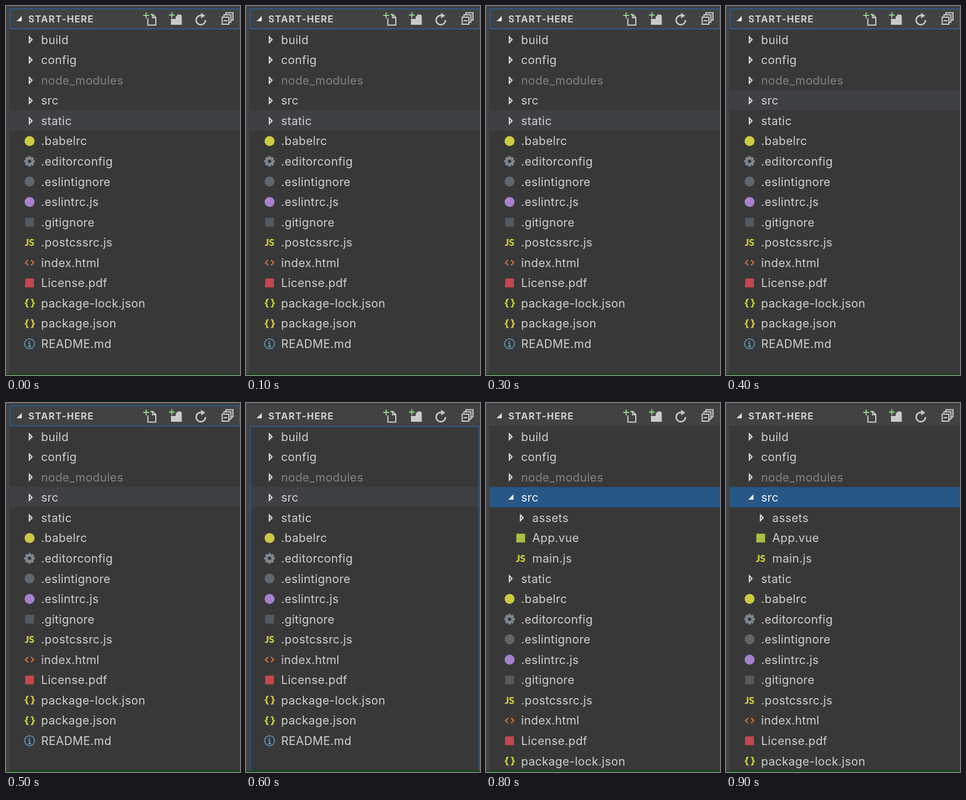
Animation, 400 px wide and 629 px high, one loop 1000 ms. Source, as an HTML page:

```html
<!DOCTYPE html>
<html lang="en">
<head>
<meta charset="utf-8">
<title>File explorer</title>
<style>
  html, body { margin: 0; width: 100%; height: 100%; overflow: hidden; background: #383838; }
  svg { display: block; width: 100%; height: 100%; }
  text { font-family: Inter, "Open Sans", sans-serif; }
  .name { font-size: 19.8px; letter-spacing: .32px; fill: #cfcfcf; }
  .dim { fill: #828282; }
  .picked { fill: #f4f4f4; }
  .title { font-size: 16px; font-weight: 700; letter-spacing: 1.1px; fill: #cecece; }
  .js { font: 900 16.5px Lato, "Open Sans", sans-serif; }
  .json { font-size: 17px; font-weight: 800; letter-spacing: -.5px; }
  .js, .json { fill: #cbcb41; text-anchor: middle; }
  .line { fill: none; stroke-width: 2; }
</style>
</head>
<body>
<svg viewBox="0 0 400 629" preserveAspectRatio="none">
  <rect width="400" height="629" fill="#383838"/>
  <rect width="5.5" height="629" fill="#434343"/>
  <rect width="400" height="5" fill="#404040"/>
  <rect x="5.5" y="5" width="394.5" height="34" fill="#424242"/>
  <rect id="band" x="5.5" width="394.5" height="34.5"/>
  <g id="tree"></g>

  <path d="M27 17V26H18Z" fill="#e2e2e2"/>
  <text class="title" x="38" y="28">START-HERE</text>
  <g class="line" stroke="#c9c9c9">
    <path d="M247 14.5H251L256 19.5V32.5H242.5V21M250.5 14.5V20H256"/>
    <path d="M290 17.5H291.5L293 14.5H299L300.5 17.5V32H282V22H290Z" fill="#c9c9c9" stroke="none"/>
    <path d="M341 24A8 8 0 1 1 335 16.3" stroke-width="2.6"/>
    <path d="M333.5 11.5L340.5 16.5L333.5 21Z" fill="#c9c9c9" stroke="none"/>
    <path d="M376 14V11.5H388V24H385M372.5 17.5V15H384.5V27.5H381.5"/>
    <path d="M369.5 19H381V31H369.5ZM372 25H378.5"/>
  </g>
  <path class="line" d="M239.5 11V21M234.5 16H244.5M283.5 10.5V20.5M278.5 15.5H288.5" stroke="#8fce91" stroke-width="2.6"/>

  <rect id="focus" x="7" fill="none" stroke="#2f5f97" stroke-width="1.6"/>
  <rect y="627" width="400" height="2" fill="#0c4d10"/>
</svg>
<script>
const LOOP = 1000, HOVER_SRC = 400, FOCUS_TREE = 600, OPEN_SRC = 800;
const PITCH = 34.55, FIRST = 57.5;
const byId = id => document.getElementById(id);
const rowY = i => FIRST + i * PITCH;

const dot = color => `<circle r="8.5" fill="${color}"/>`;
const square = color => `<rect x="-7.5" y="-7.5" width="15" height="15" fill="${color}"/>`;
const teeth = [0, 45, 90, 135].map(a =>
  `<rect x="-2.2" y="-9" width="4.4" height="18" transform="rotate(${a})"/>`).join("");

const icons = {
  closed: `<path class="line" d="M-.4 -4.8L4.2 0L-.4 4.8Z" stroke="#dedede" stroke-width="1.6"/>`,
  open: `<path d="M6.7 -5.5V3.5H-2.3Z" fill="#f4f4f4"/>`,
  gear: `<g fill="#7f8990">${teeth}<circle r="6.8"/></g><circle r="3" fill="#383838"/>`,
  js: `<text class="js" y="6">JS</text>`,
  json: `<text class="json" y="5.5">{ }</text>`,
  html: `<path class="line" d="M-2.5 -4.5L-7 0L-2.5 4.5M2.5 -4.5L7 0L2.5 4.5" stroke="#d8713c"/>`,
  info: `<g class="line" stroke="#6299bd"><circle r="8.5" stroke-width="1.7"/><path d="M0 -5V-2.8M-2 -1H0V5M-2.5 5H2.5"/></g>`,
  babel: dot("#cbcb41"),
  ignore: dot("#60666a"),
  lint: dot("#a681cd"),
  git: square("#525a60"),
  pdf: square("#c4484e"),
  vue: square("#a9bf45")
};

const before = [["build", "closed"], ["config", "closed"], ["node_modules", "closed", 0, "dim"]];
const children = [["assets", "closed", 1], ["App.vue", "vue", 1], ["main.js", "js", 1]];
const after = [
  ["static", "closed"], [".babelrc", "babel"], [".editorconfig", "gear"],
  [".eslintignore", "ignore"], [".eslintrc.js", "lint"], [".gitignore", "git"],
  [".postcssrc.js", "js"], ["index.html", "html"], ["License.pdf", "pdf"],
  ["package-lock.json", "json"], ["package.json", "json"], ["README.md", "info"]
];

function row([name, icon, depth = 0, tone = ""], i) {
  return `<g transform="translate(${depth * 19} ${rowY(i)})">
    <g transform="translate(40.3 0)">${icons[icon]}</g>
    <text class="name ${tone}" x="60" y="7.2">${name}</text></g>`;
}

function treeMarkup(open) {
  const src = ["src", open ? "open" : "closed", 0, open ? "picked" : ""];
  return [...before, src, ...(open ? children : []), ...after].map(row).join("");
}

const trees = [treeMarkup(false), treeMarkup(true)];
const band = byId("band"), focus = byId("focus");
let shown = -1;

function draw(t) {
  const open = t >= OPEN_SRC, inTree = t >= FOCUS_TREE;
  if (shown !== +open) {
    shown = +open;
    byId("tree").innerHTML = trees[shown];
  }
  band.setAttribute("y", rowY(t < HOVER_SRC ? 4 : 3) - 17.9);
  band.setAttribute("fill", open ? "#265787" : "#3f4043");
  // The tree's outline runs past the bottom edge.
  focus.setAttribute("y", inTree ? 40 : 5);
  focus.setAttribute("height", inTree ? 600 : 34);
  focus.setAttribute("width", inTree ? 391.5 : 392.5);
  focus.setAttribute("visibility", open ? "hidden" : "visible");
}

const start = performance.now();
function tick() {
  draw((performance.now() - start) % LOOP);
  requestAnimationFrame(tick);
}
draw(0);
requestAnimationFrame(tick);
</script>
</body>
</html>
```
